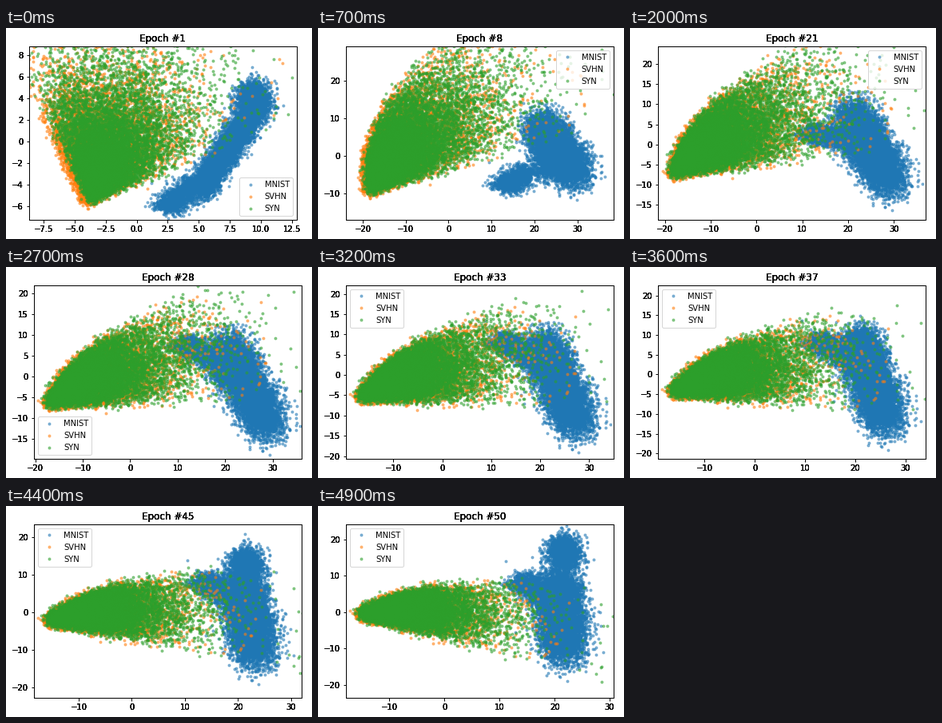
These frames come from a looping animation (383x264 px, 5 s). A matplotlib script:

```python
import matplotlib.pyplot as plt
import numpy as np
from matplotlib.animation import FuncAnimation

W, H = 383, 264
FRAMES, INTERVAL = 50, 100
AXES_W, AXES_H, AXES_BOTTOM = 334.8, 217.44, 24
COUNT = 10000

rng = np.random.default_rng(7)


def track(*poses):
    """Path through poses at the start, after the first spread, midway and at the end."""
    columns = np.transpose(poses)
    return lambda i: [np.interp(i, (0, 7, 28, 49), c)[()] for c in columns]


x_limits = track((-8.66, 12.89), (-23.9, 38.4), (-20.1, 36), (-17.9, 30.7))
y_limits = track((-7.25, 8.85), (-17, 29.2), (-20, 21.7), (-23.6, 24.2))

# Stage positions of the parts of the digit cloud
arm = track((205, 222), (237, 196), (226, 92), (258, 95))
head = track((316, 94), (278, 122), (275, 98), (300, 95))
foot = track((242, 203), (322, 182), (328, 200), (308, 180))
crown = track((310, 88), (292, 165), (278, 125), (308, 58))

along = rng.random(COUNT)
part = rng.choice(3, COUNT, p=[0.72, 0.12, 0.16])
noise = rng.normal(size=(2, COUNT))


def digit_cloud(i):
    """A thick bar from head to foot, a thin arm on its left and a crown."""
    a, h, f, c = (np.reshape(p(i), (2, 1)) for p in (arm, head, foot, crown))
    bar = h + along * (f - h)
    reach = a + 0.4 * along ** 2 * ((h + f) / 2 - a)
    width = 8 + 4 * (1 - np.exp(-i / 3)) + 0.04 * i
    return np.where(part == 0, bar + width * noise,
                    np.where(part == 1, reach + [[10], [6]] * noise,
                             c + 10.5 * noise))


def fan_sample():
    return (rng.gamma(2.2, 1, COUNT), rng.beta(1.8, 1.5, COUNT),
            rng.normal(0, 4, (2, COUNT)))


def fan_cloud(i, sample, length=1.0):
    """A fan spreading from its tip, sinking and narrowing with time."""
    distance, share, jitter = sample
    radius = distance * length * (38 - 0.16 * i)
    low, high = 20 - 0.75 * i, 118 - 1.7 * i
    bend = 1 + (1 - np.exp(-i / 3)) * radius / 250
    angle = np.radians(low + (high - low) * share / bend)
    tip_x, tip_y = 52 + 55 * np.exp(-i / 5), 216 - 1.65 * i
    return np.array([tip_x + radius * np.cos(angle),
                     tip_y - radius * np.sin(angle)]) + jitter


svhn_sample, syn_sample = fan_sample(), fan_sample()


def clouds(i):
    peek = 1 + 6 * np.exp(-i / 8)
    yield "MNIST", digit_cloud(i)
    yield "SVHN", fan_cloud(i, svhn_sample, 0.82) + [[-peek], [0.3 * peek]]
    yield "SYN", fan_cloud(i, syn_sample)


def legend_place(i):
    if i < 3:
        return "lower right"
    if i < 21:
        return "upper right"
    return "lower left" if i < 32 else "upper left"


def heavy_text(text, xy, coords, offset, **style):
    # Stacked copies harden the antialiased edges.
    for _ in range(5):
        ax.annotate(text, xy, xycoords=coords, xytext=offset,
                    textcoords="offset points", **style)


def visible_ticks(axis):
    lo, hi = axis.get_view_interval()
    ticks = [t for t in axis.get_majorticklocs() if lo <= t <= hi]
    return zip(ticks, axis.get_major_formatter().format_ticks(ticks))


def draw(i):
    ax.clear()
    ax.set(xlim=x_limits(i), ylim=y_limits(i))
    left = 29 if ax.get_ylim()[0] > -10 else 35
    ax.set_position([left / W, AXES_BOTTOM / H, AXES_W / W, AXES_H / H])

    for name, (x, y) in clouds(i):
        ax.plot(x / W, 1 - y / H, ".", alpha=0.5, label=name,
                transform=fig.transFigure)

    ax.tick_params(width=1, labelbottom=False, labelleft=False)
    for tick, label in visible_ticks(ax.xaxis):
        heavy_text(label, (tick, 0), ("data", "axes fraction"), (0, -7),
                   ha="center", va="top")
    for tick, label in visible_ticks(ax.yaxis):
        heavy_text(label, (0, tick), ("axes fraction", "data"), (-7, 0),
                   ha="right", va="center_baseline")
    heavy_text(f"Epoch #{i + 1}", (0.5, 1), "axes fraction", (0, 6),
               ha="center", va="baseline", fontsize=12)
    ax.legend(loc=legend_place(i))
    return []


plt.rcParams.update({"font.family": "DejaVu Sans", "font.size": 10,
                     "axes.linewidth": 1})
fig = plt.figure(figsize=(W / 72, H / 72), dpi=72, facecolor="white")
ax = fig.add_subplot()
anim = FuncAnimation(fig, draw, frames=FRAMES, interval=INTERVAL,
                     init_func=lambda: [], repeat=True, repeat_delay=0)
plt.show()
```
